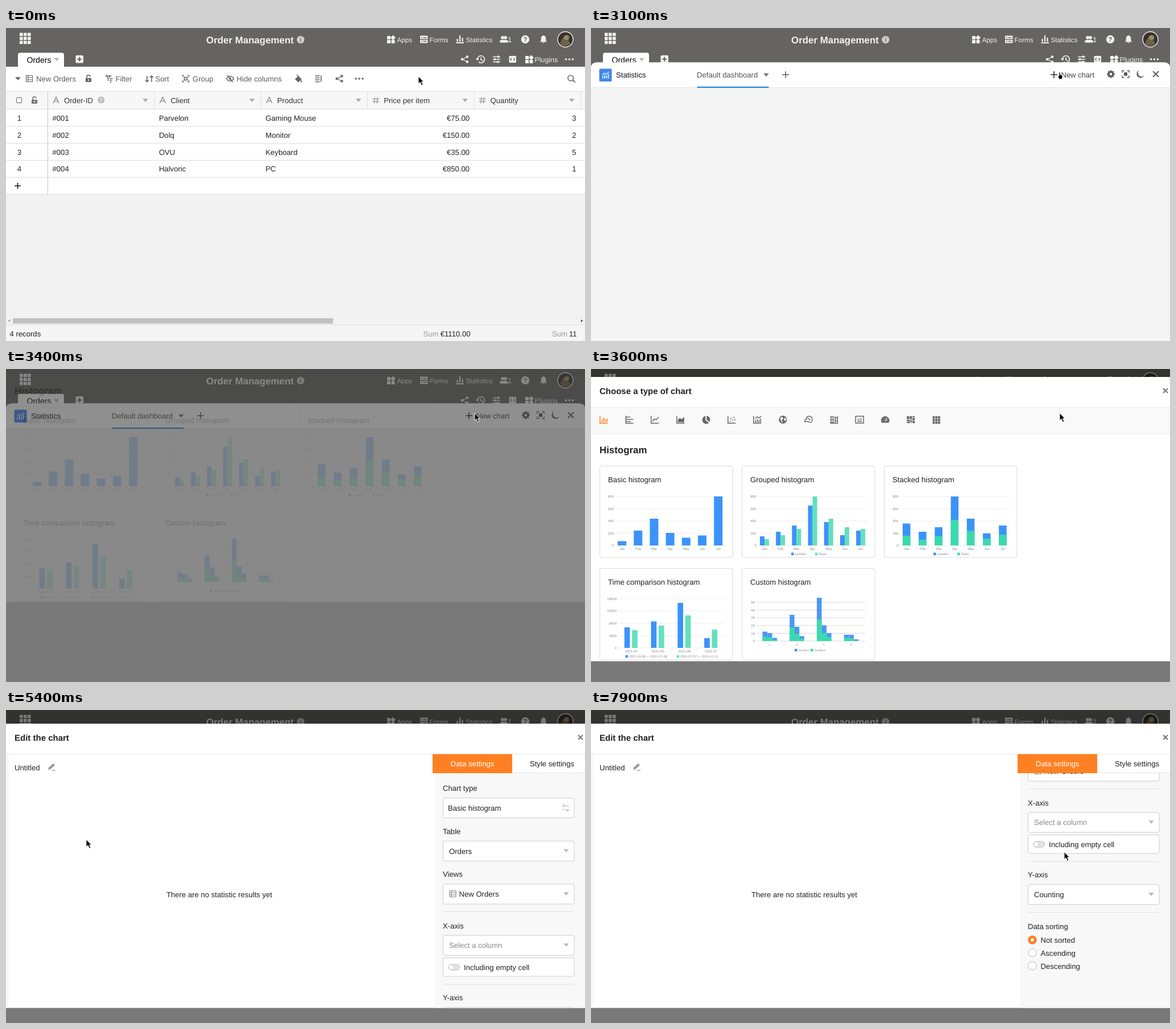
Animation, 1018 px wide and 550 px high, one loop 8000 ms. Source, as an HTML page:

```html
<!DOCTYPE html>
<html lang="en">
<head>
<meta charset="utf-8">
<title>Order Management</title>
<style>
html, body { margin: 0; width: 100%; height: 100%; overflow: hidden; background: #f3f3f3; }
svg { position: fixed; inset: 0; width: 100%; height: 100%; display: block; }
text { font-family: "Liberation Sans", Arial, sans-serif; text-rendering: geometricPrecision; }
</style>
</head>
<body>
<svg viewBox="0 0 1018 550"></svg>
<script>
const BLUE = '#3b93fa', GREEN = '#62e1bc', ORANGE = '#ff8022', GREY = '#666';
const MONTHS = ['Jan', 'Feb', 'Mar', 'Apr', 'May', 'Jun', 'Jul'];

// Drawing helpers; text is placed by the middle of its capitals
const rect = (x, y, w, h, fill, extra = '') =>
  `<rect x="${x}" y="${y}" width="${w}" height="${h}" fill="${fill}" ${extra}/>`;
const box = (x, y, w, h, stroke = '#ccc', extra = '') =>
  rect(x, y, w, h, '#fff', `rx="3" stroke="${stroke}" ${extra}`);
const circle = (x, y, r, fill, extra = '') =>
  `<circle cx="${x}" cy="${y}" r="${r}" fill="${fill}" ${extra}/>`;
const text = (x, y, s, { size = 13.13, fill = '#222', anchor = 'start', weight = 400 } = {}) =>
  `<text x="${x}" y="${y + size * .36}" font-size="${size}" fill="${fill}" ` +
  `text-anchor="${anchor}" font-weight="${weight}">${s}</text>`;
const shape = (x, y, d, fill, extra = '') =>
  `<path transform="translate(${x} ${y})" d="${d}" fill="${fill}" ${extra}/>`;
const line = (x, y, d, stroke, w = 1.4) =>
  shape(x, y, d, 'none', `stroke="${stroke}" stroke-width="${w}"`);
const hline = (x, y, w, c = '#ddd') => line(x, y, `M0 0h${w}`, c, 1);
const vline = (x, y, h, c = '#ddd') => line(x, y, `M0 0v${h}`, c, 1);
const tri = (x, y, c) => shape(x, y, 'M-4.8-2.7h9.6L0 3z', c);
const group = (id, body, extra = '') => `<g id="${id}" ${extra}>${body}</g>`;

// Icons
const grid3 = (x, y, size, step, c) => {
  let s = '';
  for (let i = 0; i < 9; i++) s += rect(x + i % 3 * step, y + (i / 3 | 0) * step, size, size, c);
  return s;
};
const dots = (x, y, c) => [-6, 0, 6].map(d => circle(x + d, y, 1.8, c)).join('');
const share = (x, y, c) => line(x, y, 'M4.5-4.5L-4 0L4.5 4.5', c, 1.3) +
  [[4.5, -4.5], [-4.5, 0], [4.5, 4.5]].map(p => circle(x + p[0], y + p[1], 2.2, c)).join('');
const apps = (x, y, c) => rect(x - 7, y - 6, 6, 6, c) + rect(x - 7, y + 1, 6, 6, c) +
  rect(x + .5, y + 1, 6, 6, c) + shape(x + 3.5, y - 3, 'M0-4.5L4.5 0L0 4.5L-4.5 0z', c);
const lock = (x, y, c) => rect(x - 5, y - 1, 10, 7, c, 'rx="1"') +
  line(x, y, 'M-3-1V-3a3 3 0 0 1 6-.4', c, 1.6) + circle(x, y + 2.5, 1.2, '#fff');
const sheet = (x, y, c) => line(x, y, 'M-5.5-5.5h11v11h-11zM-5.5-2h11M-5.5 2h11M-2-5.5v11', c, 1.1);
const person = (x, y, c) => circle(x, y - 3.2, 2.9, c) +
  shape(x, y, 'M-4.8 5.5V3.5Q-4.5.8 0 .8T4.8 3.5V5.5z', c);
const badge = (x, y, r, fill, s, c) => circle(x, y, r, fill) +
  text(x, y, s, { size: r * 1.6, fill: c, anchor: 'middle', weight: 700 });

function topBar() {
  const c = '#f2f2f2', nav = { size: 11.7, fill: c };
  return rect(0, 0, 1018, 68, '#656463') + grid3(24, 8.5, 5.6, 7, c) +
    text(352, 20.5, 'Order Management', { size: 16.9, fill: c, weight: 700 }) +
    badge(518, 20.5, 6.6, '#cfcfcf', 'i', '#656463') +
    apps(677, 20, c) + text(687.5, 20.5, 'Apps', nav) +
    rect(728, 13.5, 13.5, 13, c, 'rx="1"') +
    line(728, 13.5, 'M2 3.5h2M5.5 3.5h6M0 6.7h13.5M2 10h2M5.5 10h6', '#656463', 1.5) +
    text(744.5, 20.5, 'Forms', nav) +
    group('stats', line(798, 20, 'M-6.5 6H7M-4.5 4V-1M0 4V-7M4.5 4V-3', c, 2.2) +
      text(808.5, 20.5, 'Statistics', nav)) +
    person(878, 20, c) + person(873, 20, c) + text(882, 20.5, '1', { size: 13.13, fill: c }) +
    badge(913, 20, 7.2, c, '?', '#656463') +
    shape(945, 20, 'M-6 4.5L-4.3 2V-2Q-4-6 0-7Q4-6 4.3-2V2L6 4.5zM-1.8 5.5h3.6Q0 8-1.8 5.5', c) +
    avatar() +
    shape(21, 43.5, 'M0 24.5V4q0-4 4-4h73q4 0 4 4v20.5z', '#fff') +
    text(36.5, 56, 'Orders', { size: 14.07, fill: '#000' }) + tri(89, 55.5, '#bbb') +
    rect(122.5, 48, 13.5, 13.5, c, 'rx="2"') + line(129.2, 54.8, 'M-4 0h8M0-4v8', '#656463', 2) +
    share(806.5, 55, c) +
    line(835, 55, 'M-6 0a6.2 6.2 0 1 1 2 4.6M0-3.5V.5l3 2', c, 1.6) +
    shape(835, 55, 'M-9-1.5h6L-6 2.5z', c) +
    line(862.5, 55, 'M-6.5-4.5h13M-6.5 0h13M-6.5 4.5h13', c, 1.5) +
    line(862.5, 55, 'M3-6.5v4M-3-2v4M2 2.5v4', c, 2.4) +
    rect(884.5, 49, 12.5, 12, c, 'rx="1.5"') +
    line(890.7, 55, 'M-1.8-2.5L-4 0l2.2 2.5M1.8-2.5L4 0L1.8 2.5', '#656463', 1.2) +
    apps(920, 55, c) + text(929.5, 55.5, 'Plugins', { size: 12.4, fill: c }) + dots(990.5, 55, c);
}

function avatar() {
  return circle(983.5, 20, 13.5, '#37332c') +
    shape(983.5, 20, 'M-9 9Q-8-1-3-3Q0-10 6-7Q9-2 5 2Q9 5 8 9Q0 14-9 9z', '#6d6149') +
    `<ellipse cx="985" cy="17" rx="4.5" ry="4" fill="#9a8b6c"/>` +
    circle(983.5, 20, 13.5, 'none', 'stroke="#eee" stroke-width="1.4"');
}

function toolbar() {
  const c = GREY, opt = { fill: '#5c5c5c' };
  return rect(0, 68, 1018, 44, '#fff') + tri(21, 89, c) +
    sheet(41, 89, c) + text(53, 89.5, 'New Orders', opt) + lock(145, 89, c) +
    line(180.5, 89, 'M-6-5h11M-4-5L-1-1V4M3-5L.5-1.5M2 0h5M2 3h4M2 6h3', c, 1.5) +
    text(192.5, 89.5, 'Filter', opt) +
    line(252, 89, 'M-4-5V5.5M-7 2.5L-4 5.5L-1 2.5M4 6V-4.5M1-2L4-5L7-2', c, 1.6) +
    text(262.5, 89.5, 'Sort', opt) +
    line(316, 89, 'M-5.5-3V-5.5h2.5M3-5.5h2.5V-3M5.5 3v2.5H3M-3 5.5h-2.5V3M-2.5-2.5h5v5h-5z', c, 1.6) +
    text(328, 89.5, 'Group', opt) +
    line(394, 89, 'M-6.5 0Q0-8.5 6.5 0Q0 8.5-6.5 0M-5-6L5 6', c, 1.5) + circle(394, 89, 2, c) +
    text(405.5, 89.5, 'Hide columns', opt) +
    shape(514, 89, 'M-6 1L0-5L6 1L0 6.5zM5 2.5q3 3.5 0 4q-2.5-.5 0-4', c) +
    line(514, 89, 'M-3-7L1-3', c, 1.5) +
    line(549, 89, 'M-5.5-5h8M-5.5-1.5h8M-5.5 2h8M-5.5 5.5h8M5-5.5v11', c, 1.6) +
    share(586, 89, c) + dots(621, 89, c) +
    circle(992.8, 88, 4.8, 'none', `stroke="${c}" stroke-width="1.6"`) + line(996, 91, 'M0 0l4.5 4.5', c, 1.8);
}

function table() {
  const cols = ['Order-ID', 'Client', 'Product', 'Price per item', 'Quantity'];
  const rows = [
    ['#001', 'Parvelon', 'Gaming Mouse', '€75.00', 3],
    ['#002', 'Dolq', 'Monitor', '€150.00', 2],
    ['#003', 'OVU', 'Keyboard', '€35.00', 5],
    ['#004', 'Halvoric', 'PC', '€850.00', 1]
  ];
  const left = i => 73.5 + i * 187.4;
  let s = rect(0, 112, 1018, 31, '#f7f7f7') + rect(0, 143, 1018, 150, '#fff') + hline(0, 111.5, 1018) +
    rect(18.5, 122.5, 9, 9, '#fff', 'rx="1.5" stroke="#666"') + lock(50, 127, '#777');
  for (let i = 0; i < 6; i++) s += hline(0, 142.8 + i * 29.9, 1018);
  cols.forEach((name, i) => {
    const x = left(i);
    s += vline(left(i + 1), 112, 30) + tri(x + 171.5, 127, '#aaa');
    s += i < 3
      ? line(x + 14.5, 127, 'M-5 5L0-5.5L5 5M-3 1.5h6', '#999', 1.7)
      : line(x + 14.5, 127, 'M-6-2.3H6M-6 2.3H6M-1.8-5.5L-3 5.5M3-5.5L1.8 5.5', '#999', 1.3);
    s += text(x + 28.5, 127, name, { fill: '#333' });
  });
  s += badge(167.3, 126.5, 6, '#bbb', '?', '#fff');
  rows.forEach((row, r) => {
    const y = 158.3 + r * 29.8;
    s += text(23.5, y, r + 1, { anchor: 'middle' });
    row.forEach((v, i) => {
      s += i < 3 ? text(left(i) + 8, y, v) : text(left(i + 1) - 8, y, v, { anchor: 'end' });
    });
  });
  return s + line(20.5, 277.3, 'M-5.3 0H5.3M0-5.3V5.3', '#222', 1.7) + vline(73.5, 112, 181, '#c4c4c4');
}

function footer() {
  const dim = { fill: '#999' };
  return rect(0, 293, 1018, 257, '#f2f2f2') + rect(12, 510, 563, 9.5, '#c1c1c1') +
    shape(5, 514.5, 'M2-2.5v5L-1.5 0z', '#999') + shape(1013, 514.5, 'M-2-2.5v5L1.5 0z', '#444') +
    rect(0, 521, 1018, 29, '#f5f5f5') + hline(0, 521.5, 1018) +
    text(6.5, 537.5, '4 records') + text(733.5, 537.5, 'Sum', dim) +
    text(816.5, 537.5, '€1110.00', { anchor: 'end' }) +
    text(960, 537.5, 'Sum', dim) + text(1003.5, 537.5, '11', { anchor: 'end' });
}

function panel() {
  const c = '#5a5a5a';
  const teeth = [0, 45, 90, 135].map(a =>
    `<path d="M-1.5-6.8h3v13.6h-3z" fill="${c}" transform="translate(914 81) rotate(${a})"/>`).join('');
  return shape(0, 60.5, 'M0 490V10Q0 0 10 0H1008Q1018 0 1018 10V490z', '#f4f4f4') +
    shape(0, 60.5, 'M0 44V10Q0 0 10 0H1008Q1018 0 1018 10V44z', '#fff') + hline(0, 105, 1018, '#e2e2e2') +
    rect(14.5, 71.5, 22, 22.5, '#4088ee', 'rx="2"') +
    line(25.5, 83, 'M-5 5.5V2M-1.7 5.5V-.5M1.7 5.5V1M5 5.5V-2', '#fff', 1.7) +
    line(25.5, 83, 'M-6 0L-1.7-4L1.5-1.5L6-6', '#fff', 1.1) +
    text(44, 82.5, 'Statistics', { fill: '#111' }) +
    text(186, 82, 'Default dashboard', { fill: '#555' }) + tri(308, 82.5, '#777') +
    rect(186.5, 103, 126, 2, '#1787dc') + line(342.2, 82, 'M-6 0H6M0-6V6', c, 1.5) +
    box(797.5, 70.5, 98, 24, '#ddd', 'id="newBorder"') + line(814, 82, 'M-6 0H6M0-6V6', '#333', 1.7) +
    text(826.5, 82.5, 'New chart', { size: 13, fill: '#444' }) +
    teeth + circle(914, 81, 5, c) + circle(914, 81, 2.2, '#fff') +
    line(940, 81, 'M-6-2.5V-6h3.5M2.5-6H6v3.5M6 2.5V6H2.5M-2.5 6H-6V2.5', c, 1.5) + rect(937, 78, 6, 6, c) +
    shape(966, 81, 'M-2.5-6.8A5.8 5.8 0 0 0 6.8 2.5A7 7 0 1 1-2.5-6.8z', c) +
    line(993, 81, 'M-5-5L5 5M5-5L-5 5', c, 1.8);
}

// Chart picker
const tiny = (x, y, s, anchor = 'middle', size = 6) => text(x, y, s, { size, fill: '#888', anchor });
const bar = (x, top, w, base, c) => rect(x, top, w, base - top, c);
const axis = (labels, x, y0, y1, w, c = '#eee') => labels.map((v, i) => {
  const y = y0 + (y1 - y0) * i / (labels.length - 1);
  return tiny(x, y, v, 'end') + hline(x + 4, y, w, c);
}).join('');
const legend = (x, y, c, s, size = 6) => rect(x, y - 2.3, 4.6, 4.6, c) + tiny(x + 6.5, y, s, 'start', size);

function monthChart(x, draw) {
  return axis([800, 600, 400, 200, 0], x + 25, 234, 320, 192) + MONTHS.map((m, i) => {
    const cx = x + 39.5 + i * 28.2;
    return draw(i, cx) + tiny(cx, 325.7, m);
  }).join('');
}

function charts() {
  const cities = (x, g) => legend(x, 335, BLUE, 'London') + legend(x + 42, 335, g, 'Paris');
  const basic = [312.5, 294, 273, 298, 306.5, 302.5, 234];
  const one = [304, 296, 285, 250, 279, 302, 294], two = [309, 302, 291, 234, 273, 288, 291];
  const total = [281.5, 296, 288, 234, 273, 299, 285], part = [303, 310, 304, 275, 294.5, 308, 301];
  const deep = '#3bdaac';
  let s = monthChart(15, (i, x) => bar(x - 7.5, basic[i], 15, 320, BLUE)) +
    monthChart(265.5, (i, x) => bar(x - 8, one[i], 8, 320, BLUE) + bar(x, two[i], 8, 320, GREEN)) +
    monthChart(515.5, (i, x) => bar(x - 7, total[i], 13.5, 320, BLUE) + bar(x - 7, part[i], 13.5, 320, deep)) +
    cities(352, GREEN) + cities(602, deep);

  s += axis([16000, 12000, 8000, 4000, 0], 45, 413.5, 500, 186);
  [[464, 469], [453.5, 461], [421, 443], [483, 468]].forEach(([a, b], i) => {
    const x = 58.7 + i * 46.8;
    s += bar(x, a, 9.7, 500, BLUE) + bar(x + 13.4, b, 9.7, 500, GREEN) + tiny(x + 12, 506, '2021-0' + (4 + i));
  });
  s += legend(60.5, 515, BLUE, '2021-04-08 — 2021-07-08', 5.7) +
    legend(150.5, 515, GREEN, '2021-07-07 — 2021-11-11', 5.7);

  s += axis([50, 40, 30, 20, 10, 0], 288, 420, 488, 190, '#d8d8d8');
  [[471.5, 480.5, 474, 481.5, 482.5, 486], [442, 464, 463, 475.5, 479.5, 484],
   [412, 450, 460.5, 474, 474, 481], [477, 482, 477, 483, 485, 487]].forEach((tops, g) => {
    const x = 301.5 + g * 47.8;
    for (let i = 0; i < 3; i++) {
      s += bar(x + i * 8.6, tops[2 * i], 8.4, 488, '#4c97f3') + bar(x + i * 8.6, tops[2 * i + 1], 8.4, 488, deep);
    }
    s += tiny(x + 12.5, 494.5, 'ABCD'[g], 'middle', 4.5);
  });
  return s + legend(358, 504, BLUE, 'Number1', 4.8) + legend(386, 504, deep, 'Number2', 4.8);
}

function typeIcons() {
  const frame = 'M-6.5-6.5V6.3H7';
  const strokes = [
    frame + 'M-3 4.5V0M0 4.5V-4M3 4.5V-1M6 4.5V-2',
    'M-6-7V7M-6-4.5H2M-6-.5H7M-6 3.5H3M-6 6.5H7',
    frame + 'M-4 3L-1-1.5L2 .5L6.5-4.5',
    frame, '',
    frame + 'M-3.5 3h2M-2-2h2M1 1h2M3-4h2M5 0h2',
    frame + 'M-3 5V1M0 5V-1M3 5V0M6 5V-2M-4-2L0-5L3-3L7-6', '',
    'M-6 4Q-8 0-3-1Q-4-6 1-6Q7-6 6-1Q8 4 3 5Q-1 2-6 4zM-1-3L3 1',
    'M-5.5-6v12M-1.5-6v12M2-6v12M6-6v12M-5.5-5h4M-5.5 0h4M-5.5 5h4M2-3h4M2 2h4M-7 6.3H7',
    'M-7-6H7V6H-7zM-4 3H4'
  ];
  const fills = {
    3: 'M-4.5 4.5V0L-1-3L2-.5L6.5-5V4.5z',
    4: 'M-1-6.5V1L5 5.5A7 7 0 1 1-1-6.5zM1-6.8A7 7 0 0 1 6 4L1 0z',
    11: 'M-6 5.5A7.3 7.3 0 1 1 6 5.5z',
    12: 'M-7-6h4v5h-4zM-2-6h4v5h-4zM3-6h4v2h-4zM3-3h4v4h-4zM-7 0h6v2.5h-6zM0 0h2v5.5h-2zM-7 3.5h6v2.5h-6zM3 2h4v4h-4z'
  };
  let s = '';
  for (let i = 0; i < 14; i++) {
    const x = 22.3 + i * 45, c = i ? GREY : ORANGE;
    if (strokes[i]) s += line(x, 99, strokes[i], c, 1.5);
    if (fills[i]) s += shape(x, 99, fills[i], c);
    if (i === 7) s += circle(x, 99, 7, c) + shape(x, 99, 'M-5-3L-1-5L1-2L-2 1L0 4L-2 5L-4 0zM3-4L6-1L4 3L2 0z', '#f9f9f9');
    if (i === 10) s += text(x, 98, '123', { size: 5, fill: c, anchor: 'middle', weight: 700 });
    if (i === 11) s += line(x, 99, 'M-4 1h1M-2-3l.5.7M4 1h-1M0 3L3-3', '#f9f9f9', 1.3);
    if (i === 13) s += grid3(x - 6.7, 93, 3.9, 4.7, c);
  }
  return s;
}

const cards = [['Basic', 15.5, 180.5], ['Grouped', 265.5, 180.5], ['Stacked', 515.5, 180.5],
  ['Time comparison', 15.5, 360.5], ['Custom', 265.5, 360.5]];

const modalHead = title => rect(0, 24, 1018, 499.5, '#fff') +
  text(15, 49, title, { size: 15, weight: 700 }) +
  line(1010, 48, 'M-4-4L4 4M4-4L-4 4', '#777', 2.1);

function picker() {
  return modalHead('Choose a type of chart') + rect(0, 77, 1018, 47, '#f9f9f9') +
    hline(0, 77.5, 1018, '#e8e8e8') + hline(0, 124, 1018, '#eaeaea') + typeIcons() +
    text(15, 152, 'Histogram', { size: 16.88, weight: 700 }) +
    cards.map(([name, x, y]) => box(x, y, 233.5, 160.5, '#dadada', 'class="card"') +
      text(x + 14.5, y + 24, name + ' histogram')).join('') + charts();
}

// Chart editor
function editor() {
  const pick = (y, s, x = 779, fill = '#222', id = '') =>
    box(768.5, y, 230.5, 35, '#ccc', id) + text(x, y + 17.5, s, { fill }) + tri(985, y + 17, '#bbb');
  const label = (y, s) => text(768, y, s);
  const rule = y => hline(768.5, y, 230.5, '#e0e0e0');
  const radio = (y, s, on) => circle(776, y, on ? 5.2 : 7.3, '#fff',
    on ? `stroke="${ORANGE}" stroke-width="5"` : 'stroke="#bbb"') + text(790.5, y + .5, s);
  const body = label(137, 'Chart type') + box(768.5, 154.5, 230.5, 35) + text(777, 172, 'Basic histogram') +
    line(984, 172, 'M6-3H-5L-2-6M-6 3H5L2 6', '#aaa', 1.2) +
    label(213, 'Table') + pick(230.3, 'Orders', 779, '#222', 'id="tablePick"') +
    label(288.5, 'Views') + pick(306, 'New Orders', 796.5) + sheet(785.5, 323, '#888') +
    rule(354.5) + label(379, 'X-axis') + pick(396, 'Select a column', 779, '#888') +
    box(768.5, 435.5, 230.5, 32.5) + rect(778, 447, 19.5, 10, '#e4e4e4', 'rx="5" stroke="#bbb"') +
    circle(783, 452, 4.8, '#fff', 'stroke="#bbb"') + text(805, 452, 'Including empty cell') +
    rule(482) + label(505.5, 'Y-axis') + pick(522.7, 'Counting') + rule(571.5) +
    label(596, 'Data sorting') + radio(620, 'Not sorted', true) + radio(642.5, 'Ascending') +
    radio(665.5, 'Descending');
  return modalHead('Edit the chart') + rect(0, 77, 5, 446.5, '#f9f9f9') + rect(755, 77, 263, 446.5, '#f8f8f8') +
    hline(0, 77.5, 1018, '#e8e8e8') + text(15, 101, 'Untitled') +
    shape(80, 100, 'M-6 5L-5 1L3-6L6-3L-2 4z', '#999') + line(80, 100, 'M0 6h7', '#999', 1.3) +
    text(375, 324, 'There are no statistic results yet', { anchor: 'middle' }) +
    rect(890, 78, 128, 32.5, '#fff') + hline(890, 110.5, 128, '#e4e4e4') + rect(750, 77.5, 140, 33.5, ORANGE) +
    text(820, 94.5, 'Data settings', { fill: '#fff', anchor: 'middle' }) +
    text(960, 94.5, 'Style settings', { anchor: 'middle' }) +
    `<clipPath id="view"><rect x="755" y="111" width="263" height="412.5"/></clipPath>` +
    `<g clip-path="url(#view)">${group('settings', body)}</g>`;
}

const pointer = 'stroke="#fff" stroke-width="1" stroke-linejoin="round"';
document.querySelector('svg').innerHTML =
  topBar() + toolbar() + table() + footer() + group('panel', panel()) +
  rect(0, 0, 1018, 550, '#000', 'id="shade"') +
  group('picker', picker()) + group('editor', editor()) +
  group('cursor',
    shape(0, 0, 'M0 0V13L3 10.2L5.5 15.8L7.9 14.7L5.5 9.4H9.4z', '#000', `id="arrow" ${pointer}`) +
    shape(0, 0, 'M-1.2 1Q0-.8 1.2 1V4.5L5 5.5V9L4 12.5H-1L-3 8.5V6L-1.2 7z', '#000', `id="hand" ${pointer}`));

const $ = id => document.getElementById(id);
const show = (id, on) => $(id).setAttribute('visibility', on ? 'visible' : 'hidden');
const shift = (id, x, y) => $(id).setAttribute('transform', `translate(${x} ${y})`);
const cardBoxes = document.querySelectorAll('.card');

// Cursor stops: time, x, y
const stops = [[400, 725, 85], [900, 811, 22], [2200, 811, 22], [2600, 824, 77.5], [4100, 824, 77.5],
  [4200, 816, 82.5], [5000, 141, 227.5], [6200, 141, 227.5], [6300, 186, 238.5], [6400, 186, 238.5],
  [6500, 326, 259.5], [6700, 326, 259.5], [7300, 832, 249.5]];

function cursorAt(t) {
  const n = stops.findIndex(s => s[0] > t);
  if (n === 0) return stops[0].slice(1);
  if (n < 0) return stops[stops.length - 1].slice(1);
  const [t0, x0, y0] = stops[n - 1], [t1, x1, y1] = stops[n];
  const p = (t - t0) / (t1 - t0), e = p * p * (3 - 2 * p);
  return [x0 + (x1 - x0) * e, y0 + (y1 - y0) * e];
}

function draw(t) {
  const [x, y] = cursorAt(t);
  const within = (t0, t1) => t >= t0 && t < t1;
  shift('cursor', x, y);

  show('panel', t >= 1400);
  $('stats').setAttribute('opacity', within(1400, 2300) ? .75 : 1);
  $('newBorder').setAttribute('stroke-opacity', t < 3000 ? 1 : t < 3100 ? .5 : 0);
  $('shade').setAttribute('opacity', t < 3300 ? 0 : t < 3400 ? .33 : .5);

  show('picker', within(3400, 5100));
  $('picker').setAttribute('opacity', t < 3600 ? .12 : 1);
  shift('picker', 0, t < 3600 ? -114 : t < 3700 ? -10 : 0);
  let overCard = false;
  cardBoxes.forEach((el, i) => {
    const [, cx, cy] = cards[i];
    const on = within(4200, 5100) && x > cx && x < cx + 233 && y > cy && y < cy + 160;
    el.setAttribute('stroke', on ? '#b4b4b4' : '#dadada');
    overCard = overCard || on;
  });

  show('editor', t >= 5100);
  const p = Math.min(1, Math.max(0, (t - 7500) / 400));
  const scroll = 216 * p * p * (3 - 2 * p);
  shift('settings', 0, -scroll);
  $('tablePick').setAttribute('stroke', x > 768 && t >= 6800 && !scroll ? '#999' : '#ccc');

  const hand = within(900, 2300) || within(2600, 3300) || overCard;
  show('hand', hand);
  show('arrow', !hand);
}

const start = performance.now();
function tick() {
  const t = (performance.now() - start) % 8000;
  draw(Math.floor(t / 100) * 100);
  requestAnimationFrame(tick);
}
tick();
</script>
</body>
</html>
```
